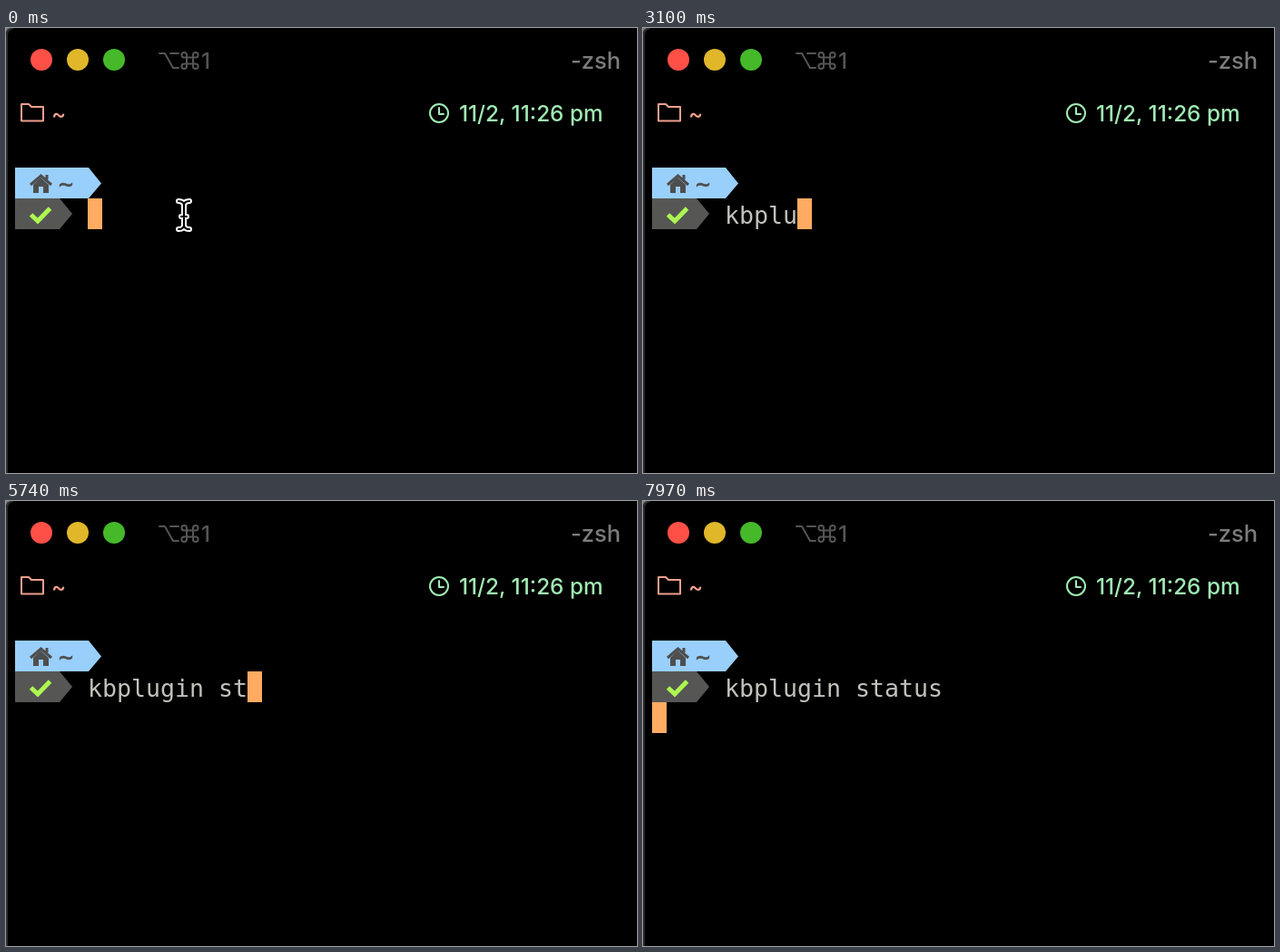
An HTML page for the animation above (7990 ms loop, 695x491 px).

```html
<!DOCTYPE html>
<html lang="en">
<head>
<meta charset="utf-8">
<title>Terminal</title>
<style>
  html, body { margin: 0; width: 100%; height: 100%; overflow: hidden; background: #000; }
  svg { display: block; width: 695px; height: 491px; }
  text { white-space: pre; }
  .ui { font-family: Inter, sans-serif; font-size: 24.3px; font-weight: 500; }
  .title { font-size: 25.5px; }
  .mono { font-family: "DejaVu Sans Mono", monospace; font-size: 26.58px; }
  .line { fill: none; stroke-width: 2; stroke-linejoin: round; stroke-linecap: round; }
</style>
</head>
<body>
<svg viewBox="0 0 695 491">
  <rect width="695" height="491"/>
  <path d="M1 491V8Q1 1 8 0" fill="none" stroke="#2c2c2c" stroke-width="2"/>
  <path d="M0 0H5Q1 1 0 5Z" fill="#777"/>

  <!-- title bar -->
  <circle cx="39" cy="35" r="12" fill="#ff5048"/>
  <circle cx="79" cy="35" r="12" fill="#e0b72a"/>
  <circle cx="119" cy="35" r="12" fill="#45b92a"/>
  <g class="line" stroke="#555">
    <path d="M169 28H175L184 44H190M181 28H190"/>
    <path d="M199 32.500H196.200A2.800 2.800 0 1 1 199 29.700V42.300A2.800 2.800 0 1 1 196.200 39.500
      H208.800A2.800 2.800 0 1 1 206 42.300V29.700A2.800 2.800 0 1 1 208.800 32.500Z"/>
  </g>
  <text class="ui" x="215" y="45" fill="#555">1</text>
  <text class="ui title" x="677" y="45" fill="#7c7c7c" text-anchor="end">-zsh</text>

  <!-- status bar -->
  <path class="line" stroke="#eda08c" d="M17 102.500V84H25L28 87H41V102.500Z"/>
  <text class="ui" x="50" y="103" fill="#eda08c">~</text>
  <g class="line" stroke="#a0ebb4">
    <circle cx="477" cy="94" r="10"/>
    <path d="M477 88V95H482"/>
  </g>
  <text class="ui" x="657.5" y="103" fill="#a0ebb4" text-anchor="end">11/2, 11:26 pm</text>

  <!-- prompt -->
  <path d="M10 154H91L105 171.500L91 188H10Z" fill="#99cffb"/>
  <path d="M10 188H59L73 205L59 222H10Z" fill="#565654"/>
  <path d="M38 165L47 173V182H41V175H36V182H30V173Z" fill="#4e4e4e"/>
  <path d="M27 173L38.500 163L50 173M45 162V167" fill="none" stroke="#4e4e4e" stroke-width="3"/>
  <text class="mono" x="58" y="181" fill="#4e4e4e" stroke="#4e4e4e" stroke-width=".6">~</text>
  <path d="M27.500 206L35 213L48.500 199" fill="none" stroke="#adf752" stroke-width="5"/>

  <text class="mono" id="command" x="90" y="216" fill="#c2c2bc"></text>
  <rect id="cursor" width="16" height="34" fill="#ffab62"/>

  <g id="pointer" class="line">
    <path id="beam" stroke="#fff" style="stroke-width:6"
      d="M190 191Q196 191 196 196Q196 191 202 191M196 196V217M190 222Q196 222 196 217Q196 222 202 222M193 208H199"/>
    <path stroke="#000"
      d="M190 191Q196 191 196 196Q196 191 202 191M196 196V217M190 222Q196 222 196 217Q196 222 202 222M193 208H199"/>
  </g>
</svg>
<script>
  const LOOP = 7990;
  const COMMAND = "kbplugin status";
  const KEY_TIMES = [1000, 1600, 2000, 2450, 2850, 3500, 4100, 4700,
                     5050, 5350, 5600, 5800, 5930, 6050, 6150];
  const ENTER_TIME = 7200;
  const CELL = 16;
  const [command, cursor, pointer] =
    ["command", "cursor", "pointer"].map(id => document.getElementById(id));
  const start = performance.now();

  function draw(now) {
    const t = Math.max(0, now - start) % LOOP;
    const typed = KEY_TIMES.filter(time => time <= t).length;
    const entered = t >= ENTER_TIME;
    command.textContent = COMMAND.slice(0, typed);
    cursor.setAttribute("x", entered ? 10 : 90 + typed * CELL);
    cursor.setAttribute("y", entered ? 222 : 188);
    pointer.style.display = typed ? "none" : "";
    requestAnimationFrame(draw);
  }
  draw(start);
</script>
</body>
</html>
```
